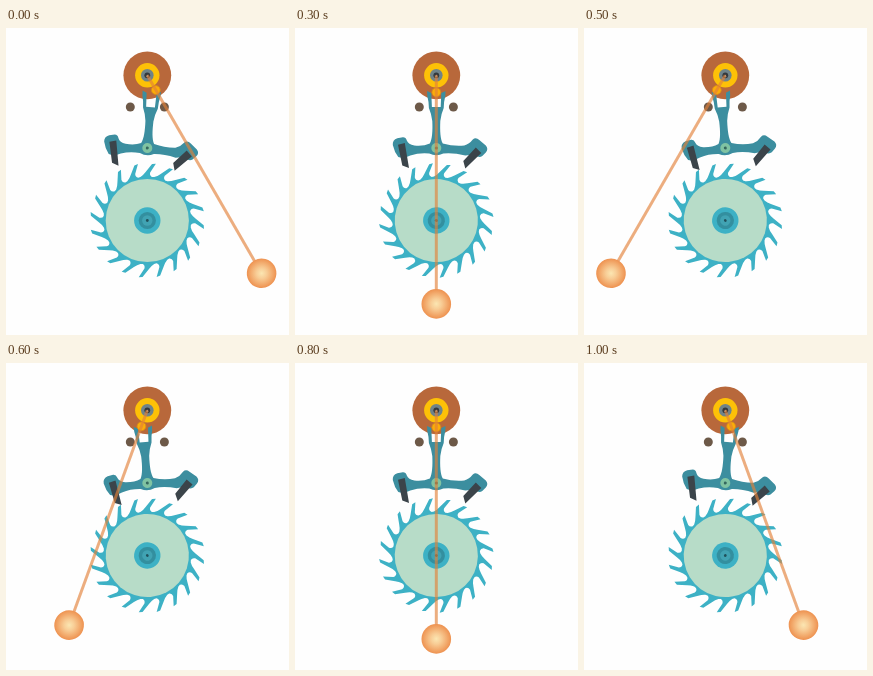
An HTML page for the animation above (1100 ms loop, 283 px wide and 307 px high).

```html
<!DOCTYPE html>
<html lang="en">
<head>
<meta charset="utf-8">
<title>Escapement</title>
<style>
  html, body { margin: 0; width: 100%; height: 100%; overflow: hidden; background: #fefefe; }
  svg { display: block; width: 283px; height: 307px; }
</style>
</head>
<body>
<svg viewBox="0 0 283 307">
  <defs>
    <radialGradient id="glow">
      <stop offset="0" stop-color="#fbe6b2"/>
      <stop offset=".35" stop-color="#f8cd96"/>
      <stop offset="1" stop-color="#ee9250"/>
    </radialGradient>
  </defs>

  <g transform="translate(141.3 192.5)">
    <g id="wheel">
      <path id="teeth" fill="#3db1c5"/>
      <circle r="41.6" fill="#b7dcc8"/>
      <circle r="13.2" fill="#3db1c5"/>
      <circle r="8.6" fill="#338f9f"/>
      <circle r="5.2" fill="#41a3b3"/>
      <circle r="1.4" fill="#20525c"/>
    </g>
  </g>

  <g transform="translate(141.3 47.3)">
    <circle r="23.9" fill="#b8683b"/>
    <circle r="12.2" fill="#fdc107"/>
    <circle r="6.3" fill="#6f8389"/>
  </g>

  <g fill="#6d5948">
    <circle cx="124.3" cy="79" r="4.5"/>
    <circle cx="158.4" cy="79" r="4.5"/>
  </g>

  <g transform="translate(141.3 120)">
    <g id="anchor">
      <path fill="#3c8e9f" d="M-9.2 -57 L-5 -55 L-4.4 -41 H4.4 L5 -55 L9.2 -57
        L9 -52 Q7.6 -47 7.4 -40 Q4.8 -34 4 -27 C3.6 -17 4 -9 6.5 -4.5
        Q17 -1.5 28 -2.5 Q33 -4 36.5 -8.5 Q39.5 -11 43 -8 L49.5 -2.5
        Q52.5 1 49.5 4.5 L46 8 Q43 10 39 7.5 Q34 6.5 29 7.5 Q17 4.5 7 5.5
        Q0 9 -7 5.5 Q-17 4.5 -26 7.5 Q-33 11 -38 9 Q-42 4 -43.5 -3
        Q-44 -8 -39 -9.8 L-33.5 -10.8 Q-30.5 -11 -29.5 -7.5 Q-28 -3.5 -22 -2.5
        Q-13 -1.5 -6.5 -4.5 C-4 -9 -3.6 -17 -4 -27 Q-4.8 -34 -7.4 -40
        Q-7.6 -47 -9 -52 Z"/>
      <path fill="#3b444a" d="M-38.3 -3.3 L-31.5 -5 L-27.3 20 L-34 17.5 Z
        M39.5 -.5 L45 5 L29 20.5 L27 13 Z"/>
      <circle r="5" fill="#80c3a2"/>
      <circle r="1.5" fill="#35675e"/>
    </g>
  </g>

  <g transform="translate(141.3 47.3)">
    <circle r="2.9" fill="#34383b"/>
    <path d="M-1.1 1.5 L0 -.9 L1.1 1.5 Z" fill="#b4babb"/>
    <g id="pendulum">
      <circle cy="17" r="4.4" fill="#fbad08" stroke="#d68b1b" stroke-width=".8"/>
      <path d="M0 0 V215" stroke="#e38138" stroke-width="3" opacity=".64"/>
      <circle cy="228.6" r="14.8" fill="url(#glow)"/>
    </g>
  </g>
</svg>
<script>
  const STEP = 100;
  const PITCH = 18;
  const swing = [30, 22.5, 15, 0, -15, -30, -20, -10, 0, 10, 20];
  // Wheel travel in teeth: one per beat, spread over three steps.
  const advance = [0, 0, 0, 1 / 3, 2 / 3, 1, 1, 1, 4 / 3, 5 / 3, 2];
  const $ = id => document.getElementById(id);

  // Degrees run clockwise from the top.
  function polar(radius, degrees) {
    const a = degrees * Math.PI / 180;
    return `${(radius * Math.sin(a)).toFixed(2)} ${(-radius * Math.cos(a)).toFixed(2)}`;
  }

  function toothPath() {
    const parts = [];
    for (let a = 0; a < 360; a += PITCH) {
      parts.push(
        `${a ? 'L' : 'M'}${polar(44, a - 9)}`,
        `Q${polar(45.5, a - 5)} ${polar(48.5, a - 2)}`,
        `L${polar(56.6, a + 4.8)}`,
        `L${polar(57.3, a + 8.6)}`,
        `L${polar(48, a + 3.4)}`,
        `Q${polar(45, a + 2.6)} ${polar(43.8, a + 6)}`
      );
    }
    return parts.join(' ') + ' Z';
  }

  function rotate(id, degrees) {
    $(id).setAttribute('transform', `rotate(${degrees})`);
  }

  function draw(now) {
    const i = Math.floor(now / STEP) % swing.length;
    rotate('pendulum', -swing[i]);
    rotate('anchor', Math.max(-4.5, Math.min(4.5, swing[i] * 0.3)));
    rotate('wheel', advance[i] * PITCH);
  }

  $('teeth').setAttribute('d', toothPath());
  const start = performance.now();
  function tick() {
    draw(performance.now() - start);
    requestAnimationFrame(tick);
  }
  tick();
</script>
</body>
</html>
```
